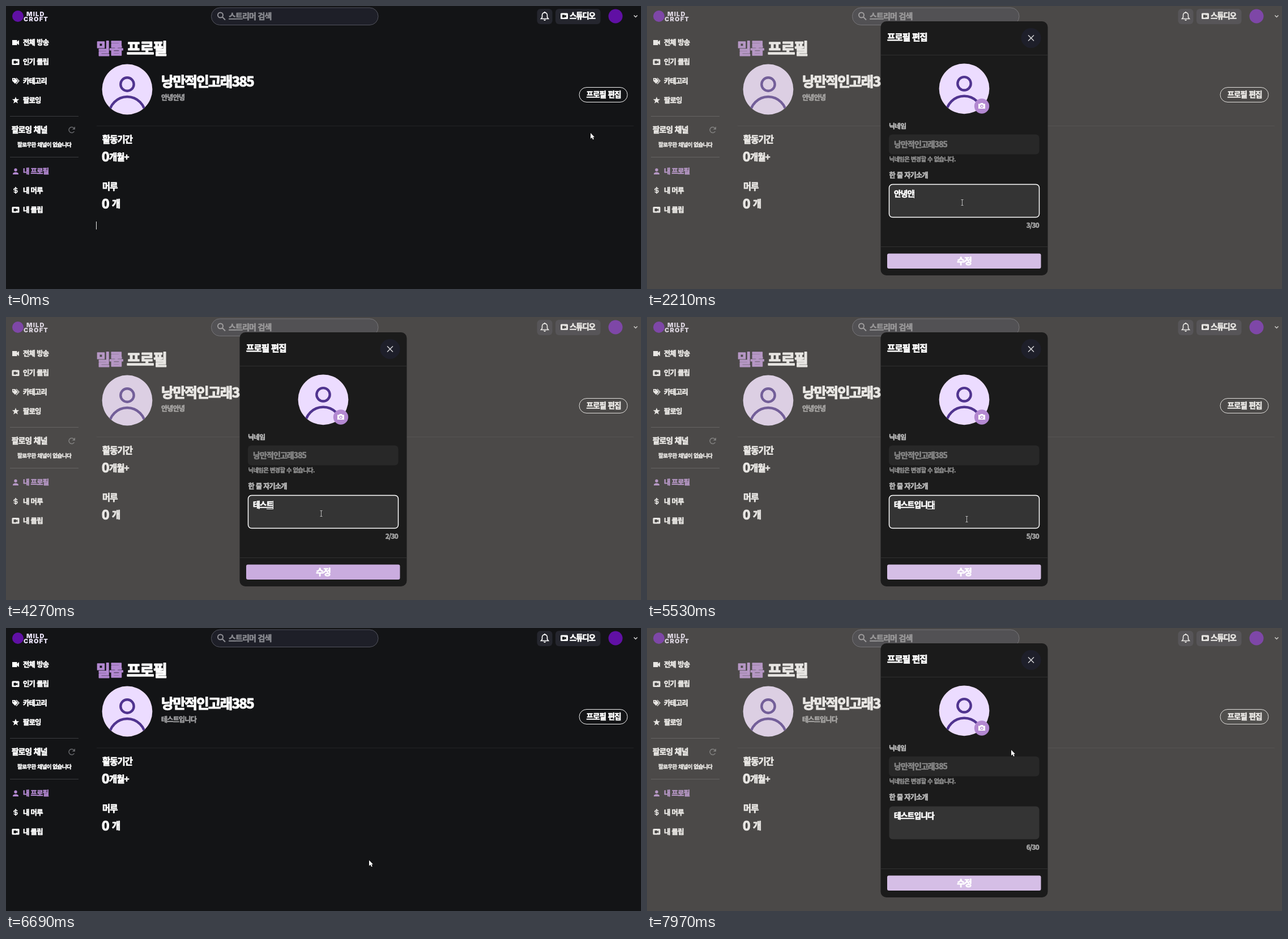
An HTML page with a canvas that plays this animation: 1121 by 499 pixels, repeating every 8 s.

```html
<!DOCTYPE html>
<html lang="ko">
<head>
<meta charset="utf-8">
<title>프로필 편집</title>
<style>
html, body { margin: 0; width: 100%; height: 100%; overflow: hidden; background: #131416; }
canvas { display: block; width: 1121px; height: 499px; }
</style>
</head>
<body>
<canvas id="stage" width="1121" height="499"></canvas>
<script>
const W = 1121, H = 499, LOOP = 8000;
const screen2d = document.getElementById('stage').getContext('2d');
const layer = document.createElement('canvas');
layer.width = W;
layer.height = H;
const layer2d = layer.getContext('2d');
let c = screen2d;

const FONT = '"Noto Sans CJK KR", "Noto Sans CJK", "Noto Sans KR", sans-serif';
const BG = '#131416', WHITE = '#ffffff', PURPLE = '#b388d1', BRAND = '#6010a4', PANEL = '#25262e';
const USER = '낭만적인고래385';

// [time, text, composing]
const TYPING = [
  [0, '안녕안녕'], [2210, '안녕안'], [2290, '안녕'], [2370, '안'], [2450, ''],
  [2830, 'ㅌ', 1], [3110, 'ㅌㅅ', 1], [3230, 'ㅌ'], [3320, ''],
  [3520, 'ㅌ', 1], [3640, '테', 1], [3760, '텟', 1], [3880, '테스', 1],
  [3990, '테슽', 1], [4130, '테스트', 1], [4330, '테스틍', 1], [4430, '테스트이', 1],
  [4510, '테스트입', 1], [4600, '테스트입ㄴ', 1], [4680, '테스트입니', 1],
  [4740, '테스트입닏', 1], [4870, '테스트입니다', 1], [6140, '테스트입니다']
];

// [time, x, y]
const MOUSE = [
  [60, 1032, 224], [470, 1048, 146], [630, 1048, 146], [1330, 556, 346],
  [5400, 556, 346], [6080, 641, 450], [6490, 641, 450], [6555, 641, 409.5],
  [6930, 641, 409.5], [7600, 1052, 152], [7745, 1052, 152], [7960, 643, 215]
];

const clamp = v => Math.max(0, Math.min(1, v));
const ramp = (t, from, to) => clamp((t - from) / (to - from));
const smooth = u => u * u * (3 - 2 * u);
const easeOut = u => 1 - (1 - u) * (1 - u);
const mix = (a, b, u) => 'rgb(' + a.map((v, i) => Math.round(v + (b[i] - v) * u)) + ')';

function mouseAt(t) {
  const i = MOUSE.findIndex(k => k[0] > t);
  if (i === 0) return MOUSE[0].slice(1);
  if (i < 0) return MOUSE[MOUSE.length - 1].slice(1);
  const a = MOUSE[i - 1], b = MOUSE[i];
  const u = smooth(ramp(t, a[0], b[0]));
  return [a[1] + (b[1] - a[1]) * u, a[2] + (b[2] - a[2]) * u];
}

function setFont(size) {
  c.font = `900 ${size}px ${FONT}`;
  c.letterSpacing = (-0.065 * size).toFixed(2) + 'px';
  c.wordSpacing = (0.09 * size).toFixed(2) + 'px';
}

// The thin outline gives the heavy weight of a display face.
function text(str, x, yMid, size, color = WHITE, align = 'left') {
  setFont(size);
  c.textAlign = align;
  c.fillStyle = c.strokeStyle = color;
  c.lineWidth = size * 0.05;
  c.lineJoin = 'round';
  const y = yMid + size * 0.37;
  c.fillText(str, x, y);
  c.strokeText(str, x, y);
  c.lineJoin = 'miter';
}

function box(x, y, w, h, r, fill, stroke, width = 1) {
  c.beginPath();
  c.roundRect(x, y, w, h, r);
  if (fill) { c.fillStyle = fill; c.fill(); }
  if (stroke) { c.strokeStyle = stroke; c.lineWidth = width; c.stroke(); }
}

function disc(x, y, r, color) {
  c.beginPath();
  c.arc(x, y, r, 0, 7);
  c.fillStyle = color;
  c.fill();
}

function draw(d, x, y, fill, stroke, width = 1) {
  const p = new Path2D(d);
  c.save();
  c.translate(x, y);
  if (stroke) { c.strokeStyle = stroke; c.lineWidth = width; c.stroke(p); }
  if (fill) { c.fillStyle = fill; c.fill(p); }
  c.restore();
}

const rule = (x1, x2, y, color) => draw(`M${x1} 0H${x2}`, 0, y, null, color);

function clipIcon(x, y) {
  box(x - 6.5, y - 5, 13, 10.5, 1.5, WHITE);
  draw('M-3.5-2H1V-.3L3.5-2V3L1 1.3V3H-3.5Z', x, y, BG);
}

function avatar(x, y) {
  c.save();
  disc(x, y, 44.4, '#ecdcff');
  c.clip();
  c.strokeStyle = '#50348f';
  c.lineWidth = 4.4;
  c.beginPath();
  c.arc(x, y - 9, 11.7, 0, 7);
  c.stroke();
  c.beginPath();
  c.arc(x, y + 45, 32, Math.PI, 0);
  c.stroke();
  c.restore();
}

function wordmark() {
  disc(21, 18, 10, BRAND);
  c.font = '900 11px Inter, sans-serif';
  c.letterSpacing = '1.2px';
  c.fillStyle = '#e9e2f7';
  c.textAlign = 'left';
  c.fillText('MILD', 36, 18);
  c.fillText('CROFT', 31, 27);
}

function header() {
  wordmark();
  box(362.5, 3, 294.5, 30.5, 15, '#1e1f28', '#53545e');
  draw('M4.5 0A4.5 4.5 0 1 1-4.5 0A4.5 4.5 0 1 1 4.5 0M3.3 3.3L8.5 8.5', 378.5, 16, null, '#909096', 2);
  text('스트리머 검색', 393, 17.5, 14, '#85868c');
  box(937.5, 5, 27, 27, 6, PANEL);
  draw('M-6.5 4.5H6.5L4.5 2V-1.5C4.5-8-4.5-8-4.5-1.5V2Z', 951, 18, null, WHITE, 1.6);
  draw('M-2 6H2Q1.5 8 0 8T-2 6ZM-1-8H1V-6H-1Z', 951, 18, WHITE);
  box(970, 5, 79.5, 27, 6, PANEL);
  clipIcon(985.5, 17.5);
  text('스튜디오', 995, 17.5, 13.2);
  disc(1076, 18, 12.5, BRAND);
  draw('M-3-1.5L0 1.5L3-1.5', 1111.5, 18, null, '#d8d8d8', 1.5);
}

function sidebar() {
  ['전체 방송', '인기 클립', '카테고리', '팔로잉'].forEach((s, i) => text(s, 30, 64 + i * 34, 12.3));
  ['내 프로필', '내 머루', '내 클립'].forEach((s, i) => text(s, 30, 291 + i * 34, 12.3, i ? WHITE : PURPLE));
  draw('M-6-4.5H2.5V-1.5L6-4.5V4.5L2.5 1.5V4.5H-6Z', 17, 64.5, WHITE);
  clipIcon(17, 98.5);
  draw('M-6-5H-1L4 0L-1 5L-6 0Z', 17, 132, WHITE);
  draw('M1-5L6 0L1 5.5', 17, 132, null, WHITE, 1.3);
  disc(13.5, 129.5, 1, BG);
  let star = 'M';
  for (let i = 0; i < 10; i++) {
    const a = i * Math.PI / 5, r = i % 2 ? 2.7 : 6.6;
    star += `${i ? 'L' : ''}${r * Math.sin(a)} ${-r * Math.cos(a)}`;
  }
  draw(star + 'Z', 17, 166.5, WHITE);
  rule(7, 128, 194.5, '#3b3c3f');
  text('팔로잉 채널', 10, 218, 13.8);
  draw('M4.4 2.5A5 5 0 1 1 3.6-3.5', 116, 218.5, null, '#66676b', 1.5);
  draw('M6-6V-.8H.8Z', 116, 218.5, '#66676b');
  text('팔로우한 채널이 없습니다', 20, 244.5, 9.6);
  rule(7, 128, 266.5, '#3b3c3f');
  disc(17, 289, 2.7, PURPLE);
  draw('M-5 5V3.5Q-4 1 0 1T5 3.5V5Z', 17, 292, PURPLE);
  draw('M3-2.2Q2.5-3.8 0-3.8T-3-1.8T0 0T3 2T0 3.9T-3 2.2M0-6V6', 17, 325, null, WHITE, 1.6);
  clipIcon(17, 359);
}

function page(t) {
  c.fillStyle = BG;
  c.fillRect(0, 0, W, H);
  header();
  sidebar();
  text('밀롭', 159, 75, 27.3, PURPLE);
  text('프로필', 213, 75, 27.3);
  avatar(214, 147);
  text(USER, 274, 133.5, 24.3);
  text(t < 6490 ? '안녕안녕' : '테스트입니다', 274, 161.5, 12.1, '#9c9c9e');
  const hover = t < 2000 ? ramp(t, 380, 500) - ramp(t, 760, 1000) : ramp(t, 7500, 7620) - ramp(t, 7790, 8010);
  box(1012, 143.5, 85, 26, 13, `rgba(255,255,255,${0.24 * clamp(hover)})`, '#f2f2f2');
  text('프로필 편집', 1024.5, 156, 13.5);
  rule(160, 1108, 211.5, '#222326');
  text('활동기간', 170, 235, 15.5);
  text('0', 169, 265, 23);
  text('개월+', 182, 266.5, 15.5);
  text('머루', 170, 318.5, 15.5);
  text('0', 169, 348.5, 23);
  text('개', 187, 349, 16.5);
  if (t < 560) { c.fillStyle = '#e8e8e8'; c.fillRect(159, 380, 1, 14); }
}

function field(t, state, top) {
  const [since, value, composing] = state;
  const focused = t >= 1380 && t < 6140;
  box(427.5, top + 287.5, 265, 58, 6, '#343434', focused ? WHITE : null, 1.5);
  const x = 436, y = top + 304;
  text(value, x, y, 13.8);
  if (!focused) return;
  setFont(13.8);
  const end = x + c.measureText(value).width;
  c.fillStyle = WHITE;
  if (composing) {
    const start = x + c.measureText(value.slice(0, -1)).width;
    c.fillRect(Math.round(start), top + 311, Math.round(end - start), 1);
  }
  const blink = (t - Math.max(since, 1380)) % 1000 < 500;
  if (composing || blink) c.fillRect(Math.round(end), top + 297, 1, 15);
}

function saveColor(t) {
  const on = t < 4100 ? ramp(t, 2370, 2620)
    : t < 5500 ? 1 - ramp(t, 4130, 4340)
    : t < 7000 ? ramp(t, 5930, 6130) : 0;
  const pressed = t >= 6140 && t < 6265 ? 0.3 : 0;
  return mix([213, 190, 230], [179, 136, 209], on + pressed);
}

function dialog(t) {
  const state = TYPING.filter(s => s[0] <= t).pop();
  const count = state[1].length - (state[2] || 0);
  const error = count < 2;
  const top = error ? 19 : 27, foot = error ? 16 : 0;
  box(412.5, top, 295, 448 + foot, 10, '#1b1b1b');
  text('프로필 편집', 424, top + 28.5, 15.6);
  disc(678, top + 29.5, 17.5, '#1e1f2a');
  draw('M-5-5L5 5M5-5L-5 5', 678, top + 29.5, null, '#d4d4d6', 1.5);
  rule(413, 707, top + 59.5, '#303030');
  avatar(560, top + 118.8);
  disc(591, top + 149.5, 13.2, PURPLE);
  draw('M-6-3.5H-3L-2-5H2L3-3.5H6V5H-6Z', 591, top + 149, WHITE);
  disc(591, top + 149.8, 2.7, PURPLE);
  disc(591, top + 149.8, 1.5, WHITE);
  text('닉네임', 427, top + 184.5, 11.8, '#b9b9b9');
  box(427, top + 199.5, 265.5, 35, 6, '#282828');
  text(USER, 436, top + 216.5, 14, '#858585');
  text('닉네임은 변경할 수 없습니다.', 427.5, top + 243, 10.4, '#8d8d8d');
  text('한 줄 자기소개', 427.5, top + 272, 12.1, '#b9b9b9');
  field(t, state, top);
  const red = '#fb4f4f';
  text(count + '/30', 692, top + 360, 11.8, error ? red : '#a6a6a6', 'right');
  if (error) text('자기소개는 2자 이상 30자 이하로 입력해주세요.', 427, top + 376, 10.5, red);
  rule(413, 707, top + foot + 397.5, '#303030');
  box(424, top + foot + 409.5, 271.5, 26.5, 3, saveColor(t));
  text('수정', 560, top + foot + 422, 15, WHITE, 'center');
}

function modal(t) {
  const first = t < 7000;
  const enter = easeOut(first ? ramp(t, 690, 890) : ramp(t, 7750, 7960));
  const leave = first ? ramp(t, 6495, 6690) : 0;
  const shown = enter * (1 - leave * leave);
  if (shown <= 0) return;
  const veil = enter * (1 - leave ** 3);
  c.fillStyle = `rgba(187,179,170,${0.335 * veil})`;
  c.fillRect(0, 0, W, H);

  layer2d.clearRect(0, 0, W, H);
  c = layer2d;
  dialog(t);
  c = screen2d;

  const k = 1 - 0.08 * (1 - shown);
  c.save();
  c.globalAlpha = shown;
  c.translate(560, 251);
  c.scale(k, k);
  c.drawImage(layer, -560, -251);
  c.restore();
}

function pointer(t) {
  const [x, y] = mouseAt(t);
  const open = (t > 690 && t < 6600) || t > 7750;
  const inside = (l, r, a, b) => x > l && x < r && y > a && y < b;
  if (open && inside(427, 693, 313, 374)) {
    draw('M-2-5H2M0-5V5M-2 5H2', Math.round(x) + 0.5, Math.round(y) + 0.5, null, '#b8b8b8');
  } else if ((open && inside(424, 696, 436, 463)) || (!open && inside(1012, 1097, 143, 170))) {
    draw('M-1 0Q0-1 1 0V5L7 6.5Q8 7 8 9L6.5 15H0L-4.5 9Q-4 7.5-1 9Z', x, y, WHITE, '#111', 1.5);
  } else {
    draw('M0 0V10L2.4 7.8L4 11.5L5.8 10.7L4.2 7.2H7Z', x, y, WHITE, '#111', 1.2);
  }
}

const begin = performance.now();
function frame() {
  const t = Math.max(0, performance.now() - begin) % LOOP;
  page(t);
  modal(t);
  pointer(t);
  requestAnimationFrame(frame);
}
frame();
</script>
</body>
</html>
```
